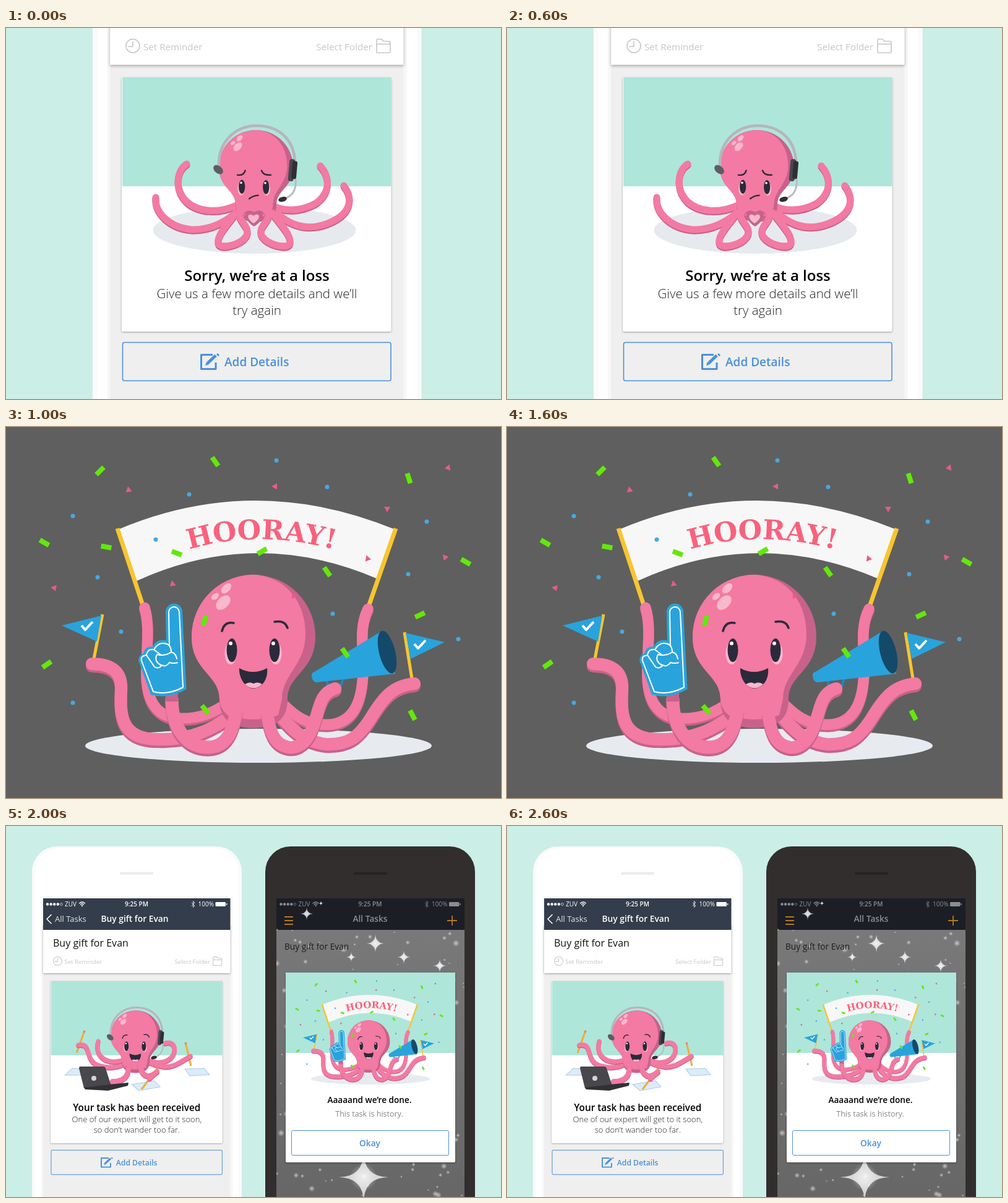
These frames come from a looping animation (800x600 px, 3 s). An HTML page:

```html
<!DOCTYPE html>
<html lang="en">
<head>
<meta charset="utf-8">
<title>Octopus helper</title>
<style>
  html, body { margin: 0; width: 100%; height: 100%; overflow: hidden; }
  svg { display: block; width: 800px; height: 600px; }
  text { font-family: 'Open Sans', sans-serif; }
  .slab { font: bold 44px 'DejaVu Serif', serif; }
  .card { filter: drop-shadow(0 1px 1.5px rgba(0, 0, 0, .35)); }
</style>
</head>
<body>
<svg id="stage" viewBox="0 0 800 600"></svg>
<script>
const PINK = '#f37aa2', DARK = '#c8628a', PALE = '#f9b8cc', INK = '#2b2a3a';
const BLUE = '#29a3dc', LINK = '#4a90dd', GOLD = '#f7c52f', MINT = '#aee6da';

const fill = (d, color) => `<path d="${d}" fill="${color}"/>`;
const line = (d, color, w, cap = 'round') =>
  `<path d="${d}" fill="none" stroke="${color}" stroke-width="${w}" stroke-linecap="${cap}" stroke-linejoin="round"/>`;
const rect = (x, y, w, h, color, r = 0, extra = '') =>
  `<rect x="${x}" y="${y}" width="${w}" height="${h}" rx="${r}" fill="${color}" ${extra}/>`;
const oval = (x, y, rx, ry, color, turn = 0) =>
  `<ellipse rx="${rx}" ry="${ry}" fill="${color}" transform="translate(${x} ${y}) rotate(${turn})"/>`;
const text = (x, y, s, size, weight = 400, color = '#000', anchor = 'middle') =>
  `<text x="${x}" y="${y}" font-size="${size}" font-weight="${weight}" fill="${color}" text-anchor="${anchor}">${s}</text>`;
const move = (transform, body) => `<g transform="${transform}">${body}</g>`;

// A limb is a light stroke over a dark one that peeps out below.
const limb = (d, w) => move(`translate(0 ${w * .09})`, line(d, DARK, w * .92)) +
  move(`translate(0 ${-w * .09})`, line(d, PINK, w * .92));

const head = face =>
  fill('M300 339A100 100 0 0 1 500 339C500 395 455 400 455 440C455 470 440 486 400 487C360 486 345 470 345 440C345 400 300 395 300 339Z', DARK) +
  fill('M300 339A100 100 0 0 1 405 239C455 245 484 285 484 335C484 385 446 400 446 440L440 466Q400 480 358 466Q345 455 345 440C345 400 300 395 300 339Z', PINK) +
  oval(351, 284, 14, 9, PALE, -45) + oval(356, 261, 10, 6, PALE, -45) +
  oval(338, 274, 7, 4.5, PALE, -40) + face;

const eye = (x, y, side) => oval(x + side * 2, y + 5, 9.5, 18, PALE) +
  oval(x, y, 8.5, 19, INK) + oval(x - 2, y - 11, 3, 3, '#fff');

const happy = eye(365, 361, -1) + eye(434, 361, 1) +
  line('M349 330Q353 314 368 317M434 315Q451 312 455 325', INK, 3.5) +
  fill('M377 390Q399 402 422 390C424 410 412 422 400 423C386 422 376 405 377 390Z', INK) +
  fill('M386 416Q394 411 400 415Q407 411 414 416Q400 429 386 416Z', PALE);

const sad = eye(362, 392, -1) + eye(427, 393, 1) +
  line('M350 360Q367 363 371 348M415 348Q419 362 440 360', INK, 4) +
  line('M382 424Q392 416 406 415', INK, 4);

const headsetOctopus = face => move('translate(164 21.6) scale(.6)', head(face)) +
  line('M344 222C343 185 370 158 405 158C445 158 468 185 467 222', '#b4b6bd', 4.5) +
  oval(343, 229, 9, 6, '#5d5d63', 40) +
  line('M467 238Q473 268 450 276', '#b9bcc3', 3) +
  move('rotate(5 463 230)', rect(457, 212, 9, 36, '#47474d', 4) + rect(462, 215, 8, 29, '#2f2f35', 3)) +
  oval(447, 277, 7, 4, '#2f2f35', -15);

const heartArm = limb('M372 300C355 322 338 340 344 351C350 358 378 352 388 338C398 322 370 312 380 298C387 288 398 291 401 299', 12);

const sorryArt = oval(401.5, 327, 164, 38, '#e6eaef') +
  limb('M292 221C275 232 272 262 292 282C312 300 345 300 372 288', 12) +
  limb('M242 275C240 300 265 324 300 327C335 328 360 312 380 292', 12) +
  limb('M508 224C524 242 525 267 500 285C475 298 450 298 430 288', 12) +
  limb('M546 256C562 277 558 302 520 317C480 332 450 315 430 292', 12) +
  headsetOctopus(sad) +
  heartArm + move('translate(802 0) scale(-1 1)', heartArm) +
  fill('M401 321C379 307 386 288 401 298C416 288 423 307 401 321Z', DARK) +
  fill('M400 316C385 306 393 297 400 304C407 297 416 306 400 316Z', PALE);

const paper = d => `<path d="${d}" fill="#dcebf9" stroke="#a9cbe8"/>`;
const pencil = (x1, y1, x2, y2) => line(`M${x1} ${y1}L${x2} ${y2}`, '#f3ab35', 3, 'butt') +
  line(`M${x1} ${y1}l${(x2 - x1) * .08} ${(y2 - y1) * .08}`, '#e8798f', 3, 'butt');

// Drawn at phone scale.
const workArt =
  paper('M95 403L107 392L131 393L121 403Z') + paper('M203 418L240 412L249 422L215 428Z') +
  paper('M289 393L320 392L329 402L297 404Z') +
  pencil(127, 331, 114, 367) + pencil(290, 350, 299, 388) +
  limb('M117 355C140 350 126 381 150 388C165 393 180 391 192 385', 8) +
  limb('M149 349C143 371 160 387 187 380', 8) +
  limb('M257 352C276 346 277 371 262 379C250 386 240 383 228 379', 8) +
  limb('M298 373C282 382 272 391 255 390C240 388 235 384 226 381', 8) +
  move('translate(-47.2 200) scale(.6376) translate(-28 -22) scale(1.067)', headsetOctopus(move('translate(-2 20)', happy))) +
  limb('M197 385C200 401 194 414 172 414', 9) +
  limb('M216 385C218 401 227 413 244 398', 9) +
  pencil(246, 390, 219, 426) + limb('M232 409L243 399', 8) +
  fill('M120 389H157Q160 389 161 392L170 420L126 424L118 392Q118 389 120 389Z', '#47474c') +
  fill('M126 423L168 418L198 415L197 420L165 428L128 426Z', '#303035') +
  oval(142, 408, 4, 4, '#d5d5d8');

const tick = (x, y) => line(`M${x} ${y}l6 7l12 -13`, '#fff', 4, 'butt');

const strips = [[152,71,-45],[338,56,55],[651,83,72],[62,187,30],[162,194,10],[276,204,20],[414,201,-30],
  [519,234,55],[743,218,30],[669,304,-25],[66,384,-35],[321,313,-75],[548,365,55],[322,457,50],[657,466,62]];
const dots = [[437,54],[296,109],[519,97],[108,144],[242,182],[680,153],[148,243],[650,238],[186,331],
  [528,302],[731,343],[108,446]];
const darts = [[198,101,-10],[434,96,-90],[715,65,20],[616,133,180],[584,212,-20],[709,210,-40],[77,260,-80],
  [269,253,-10],[466,273,90]];
const confetti =
  strips.map(([x, y, a]) => move(`translate(${x} ${y}) rotate(${a})`, rect(-8.5, -4, 17, 8, '#63e80c'))).join('') +
  dots.map(([x, y]) => oval(x, y, 3.5, 3.5, '#46a9e0')).join('') +
  darts.map(([x, y, a]) => move(`translate(${x} ${y}) rotate(${a})`, fill('M0 -5L5 4H-5Z', '#e55c8b'))).join('');

const glove =
  fill('M259 352L258 300A13.5 13.5 0 0 1 285 298L291.5 424Q262 441 234 433L215 380Q212 371 222 366Q225 354 237 355Q243 342 259 345Z', BLUE) +
  line('M264 352L263 300A8.5 8.5 0 0 1 280 299L286 421Q262 434 238 428L219 378Q217 370 227 369L240 388Q247 392 252 385Q258 389 264 381Q272 383 277 381', '#fff', 2) +
  line('M227 369Q229 358 239 360L251 369M239 360Q246 348 256 350Q267 351 267 364Q257 371 244 368Q238 379 252 386M267 364Q275 366 276 375', '#fff', 2);

const partyArt = oval(408, 515.5, 280, 27.5, '#e7ebf0') +
  fill('M183 165Q402 73 627 165L599 245Q403 161 211 249Z', '#f7f7f7') +
  '<path id="arc" d="M296 198Q411 163 545 202" fill="none"/>' +
  '<text class="slab" fill="#f8627c"><textPath href="#arc">HOORAY!</textPath></text>' +
  line('M180 164L221 288M630 164L586 290', GOLD, 7, 'butt') +
  limb('M224 294C232 320 228 350 227 390C225 440 240 473 285 473C315 473 335 464 360 447', 19) +
  limb('M585 296C572 322 576 350 577 385C578 440 565 481 520 483C485 484 465 467 450 452', 19) +
  line('M156 303L142 375M644 332L656 407', GOLD, 5, 'butt') +
  fill('M90 321L154 305L147 347ZM646 333L709 348L654 375Z', BLUE) + tick(122, 321) + tick(660, 351) +
  limb('M139 385C167 385 188 395 186 427C184 467 185 507 245 507C300 509 335 491 375 461', 22) +
  limb('M660 417C627 420 612 437 593 467C569 507 552 516 517 515C475 510 455 482 440 465', 22) +
  head(happy) +
  limb('M268 442C268 482 287 520 326 520C358 520 367 492 372 462', 23) +
  rect(258, 430, 20, 14, DARK) + glove +
  line('M518 409L521 421Q530 429 540 421L546 405', '#2386bd', 4) +
  limb('M532 425C505 432 507 462 494 492C482 520 465 521 457 520C432 516 426 492 422 465', 22) +
  fill('M494 402Q493 398 500 395L609 329L629 399L502 413Q495 413 494 402Z', BLUE) +
  oval(616, 364, 13, 35.5, '#14496a', -14) + confetti;

const button = (x, y, w, h, r, sw) => rect(x, y, w, h, 'none', r, `stroke="${LINK}" stroke-width="${sw}"`);

function status(color) {
  const signal = [67, 72.6, 78.2, 83.8].map(x => oval(x, 126.5, 2.2, 2.2, color)).join('');
  return signal + `<circle cx="89.4" cy="126.5" r="1.9" fill="none" stroke="${color}" stroke-width=".7"/>` +
    text(95, 130, 'ZUV', 10, 400, color, 'start') + text(211, 130, '9:25 PM', 10, 600, color) +
    line('M118.5 125Q123 121 127.5 125M120.5 127Q123 124.5 125.5 127', color, 1.3) +
    oval(123, 129, 1.2, 1.2, color) +
    line('M300 124L305 129L302.5 131.5V121.5L305 124L300 129', color, .8) +
    text(336, 130, '100%', 10, 400, color, 'end') + rect(338.5, 123, 16.5, 7, color, 1.2) + rect(356, 125, 1.3, 3, color);
}

// Card coordinates are the close-up ones; the phone itself is smaller.
function lightPhone(art, horizon, title, first, second) {
  const gray = '#c6c6c6';
  const card = rect(187, 80, 435.5, 411, '#fff', 2, 'class="card"') +
    rect(188, 80, 434.5, horizon - 80, MINT) + art +
    text(405.5, 409, title, 24, 600) +
    text(405.5, 437, first, 20.5, 300, '#222') + text(405.5, 464, second, 20.5, 300, '#222') +
    button(188.5, 508.5, 433.5, 62, 3, 1.6) + text(353, 547, 'Add Details', 19, 600, LINK, 'start') +
    line('M334 528.5H315.5V551.5H339V541', LINK, 3, 'butt') +
    line('M326 542L339 529.5', LINK, 5, 'butt') + fill('M322 546L324 540L328 544ZM340 528L342 526L345 529L343 531Z', LINK) +
    `<circle cx="205" cy="29" r="11" fill="none" stroke="${gray}" stroke-width="1.6"/>` +
    line('M205 22V30H198', gray, 1.6) + text(222, 36, 'Set Reminder', 15.2, 400, gray, 'start') +
    text(592, 36, 'Select Folder', 15.2, 400, gray, 'end') +
    line('M599 40V20Q599 18 601 18H607L610 21.5H619Q621 21.5 621 24V38Q621 40 619 40ZM599 26H621', gray, 1.6);
  return rect(42, 33, 339, 650, '#fafafa', 41) + rect(47, 36, 329, 650, '#fff', 38) +
    rect(57, 114, 309, 600, '#f7f7f7') + rect(184, 74.5, 54, 4.5, '#ececec', 2) +
    rect(60, 117, 302.5, 600, '#efefef') +
    rect(60, 160, 302.5, 78, '#fff', 0, 'class="card"') + rect(60, 117, 302.5, 51, '#333d4b') +
    status('#fff') + line('M73 143.5L66 150.5L73 157.5', '#fff', 1.6) +
    text(79, 155, 'All Tasks', 13, 400, '#e4e6ea', 'start') + text(208, 155, 'Buy gift for Evan', 13.8, 600, '#fff') +
    text(76, 195, 'Buy gift for Evan', 16, 400, '#111', 'start') +
    move('translate(-47.2 200) scale(.6376)', card);
}

function sparkles() {
  let seed = 7, out = '';
  const random = () => (seed = seed * 16807 % 2147483647) / 2147483647;
  const star = (x, y, s) => oval(x, y, s * .55, s * .55, 'url(#glow)') +
    move(`translate(${x} ${y}) scale(${s})`, fill('M0 -1Q.02 -.02 1 0Q.02 .02 0 1Q-.02 .02 -1 0Q-.02 -.02 0 -1Z', '#fffb'));
  for (let i = 0; i < 170; i++) {
    const r = 1.5 + 4.5 * random() ** 2;
    out += oval(437 + 304 * random(), 165 + 435 * random(), r, r, 'url(#glow)');
  }
  return out + star(597, 190, 15) + star(486, 142, 10) + star(578, 568, 40) + star(643, 212, 11) +
    star(701, 226, 11) + star(558, 212, 8) + star(509, 125, 4);
}

const darkPhone = rect(419, 33, 339, 650, '#322e2d', 41) + rect(562, 74.5, 54, 4.5, '#262322', 2) +
  rect(437, 117, 304, 500, 'url(#dim)') + rect(437, 117, 304, 51, '#1b1e25') +
  `<g clip-path="url(#screen)">${sparkles()}</g>` +
  move('translate(377.5 0)', status('#8b8d91')) +
  line('M450 147H464M450 153H464M450 159H464', '#b47a22', 1.8, 'butt') +
  line('M713 153H729M721 145V161', '#b47a22', 1.8, 'butt') +
  text(588.5, 155, 'All Tasks', 13.7, 600, '#8b8d91') +
  text(450, 200, 'Buy gift for Evan', 13.7, 400, '#1c1c1c', 'start') +
  rect(452, 237, 274, 307, '#fff', 2, 'class="card"') + rect(452, 237, 274, 130, MINT) +
  move('translate(449.2 232.3) scale(.3425)', '<use href="#party"/>') +
  text(587.5, 448, 'Aaaaand we’re done.', 13.6, 600) +
  text(587, 470, 'This task is history.', 12.5, 400, '#858585') +
  button(461.5, 492.5, 254, 40, 2, 1) + text(588, 518, 'Okay', 13.7, 600, LINK);

const backdrop = color => rect(0, 0, 800, 600, color);
const closeUp = 'scale(1.5684) translate(47.2 -200)';
const scenes = [
  backdrop('#cbeee6') + move(closeUp,
    lightPhone(sorryArt, 256, 'Sorry, we’re at a loss', 'Give us a few more details and we’ll', 'try again')),
  backdrop('#5f5f5f') + '<use href="#party"/>',
  backdrop('#cbeee6') +
    lightPhone(move(closeUp, workArt), 268,
      'Your task has been received', 'One of our expert will get to it soon,', 'so don’t wander too far.') + darkPhone
];

const stage = document.getElementById('stage');
stage.innerHTML = `<defs>
  <g id="party">${partyArt}</g>
  <radialGradient id="glow"><stop stop-color="#fff" stop-opacity=".6"/><stop offset="1" stop-color="#fff" stop-opacity="0"/></radialGradient>
  <linearGradient id="dim" x2="0" y2="1"><stop stop-color="#7b7b7b"/><stop offset="1" stop-color="#666"/></linearGradient>
  <clipPath id="screen">${rect(437, 117, 304, 500, '#000')}</clipPath>
</defs>` + scenes.map(s => `<g class="scene">${s}</g>`).join('');

const groups = stage.querySelectorAll('.scene');
function draw() {
  const current = Math.floor(performance.now() / 1000) % groups.length;
  groups.forEach((g, i) => g.style.display = i === current ? '' : 'none');
  requestAnimationFrame(draw);
}
draw();
</script>
</body>
</html>
```
